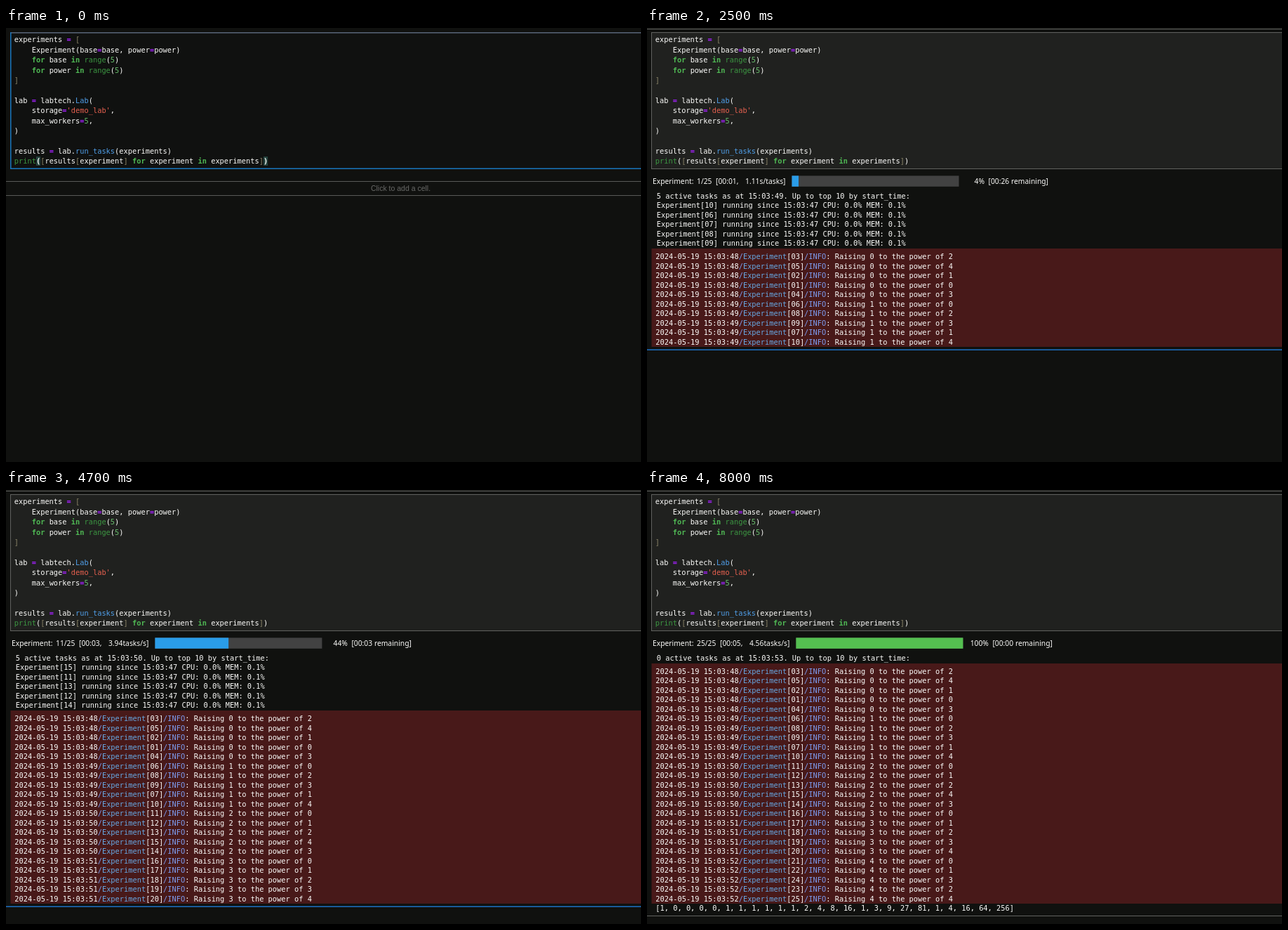
An HTML page with a canvas for the animation above (9900 ms loop, 905 px wide and 618 px high).

```html
<!DOCTYPE html>
<html lang="en">
<head>
<meta charset="utf-8">
<style>
  html, body { margin: 0; width: 100%; height: 100%; overflow: hidden; background: #10110f; }
  canvas { display: block; }
</style>
</head>
<body>
<canvas id="stage" width="905" height="618"></canvas>
<script>
const ctx = document.getElementById('stage').getContext('2d');
const LOOP = 9900, COL = 6.23, ROW = 13.5;
const MONO = '10.35px "DejaVu Sans Mono", monospace';
const SANS = '10.3px "Noto Sans", sans-serif';
const BLUE = '#1976bd', GREY = '#61625f', WHITE = '#fbfbf9';

const code = `experiments = [
    Experiment(base=base, power=power)
    for base in range(5)
    for power in range(5)
]

lab = labtech.Lab(
    storage='demo_lab',
    max_workers=5,
)

results = lab.run_tasks(experiments)
print([results[experiment] for experiment in experiments])`.split('\n');

// token pattern, colour, bold
const syntax = [
  [/^(for|in)$/, '#4fb854', true],
  [/^(range|print)$/, '#3c9742'],
  [/^(Lab|run_tasks)$/, '#4f9ee8'],
  [/^\d+$/, '#66bb6a'],
  [/^'/, '#e5604f'],
  [/^=$/, '#a020f8', true],
  [/^[[\]]$/, '#8a8468'],
  [/./, WHITE]
];

const order = [3, 5, 2, 1, 4, 6, 8, 9, 7, 10, 11, 12, 13, 15, 14,
  16, 17, 18, 19, 20, 21, 22, 24, 23, 25];

// start, done, elapsed, rate, remaining, bar left
const progress = [
  [1500, 0, '00:00', '?tasks/s', '?', 185],
  [2500, 1, '00:01', '1.11s/tasks', '00:26', 206.5],
  [3600, 6, '00:02', '3.15tasks/s', '00:06', 206.5],
  [4500, 11, '00:03', '3.94tasks/s', '00:03', 212.4],
  [5500, 16, '00:04', '4.27tasks/s', '00:02', 212.4],
  [6500, 25, '00:05', '4.56tasks/s', '00:00', 212.4]
];

// start, clock second, running tasks
const activity = [
  [1500, 48, []],
  [2500, 49, [10, 6, 7, 8, 9]],
  [3900, 50, [15, 11, 13, 12, 14]],
  [5000, 51, [20, 16, 18, 17, 19]],
  [6200, 52, [25, 21, 23, 22, 24]],
  [6900, 53, []]
];

const batchTimes = [1500, 2500, 3600, 4500, 5500];
const current = (states, t) => states.filter(s => s[0] <= t).pop();
const pad = n => String(n).padStart(2, '0');

// Baselines sit on whole pixels so that the glyphs stay crisp.
function text(s, x, y, color = WHITE, font = MONO, align = 'left') {
  ctx.font = font;
  ctx.fillStyle = color;
  ctx.textAlign = align;
  ctx.fillText(s, x, Math.round(y));
}

function box(x, y, w, h, color) {
  ctx.fillStyle = color;
  ctx.fillRect(x, y, w, h);
}

const rule = (y, color, weight = 1) => box(0, y, 905, weight, color);

function drawCell(focused) {
  if (!focused) rule(1, GREY);
  box(6, 6, 899, 195, focused ? '#101110' : '#20211f');
  if (focused) {
    box(6, 6, 899, 1.5, '#596579');
    box(6, 6, 1.5, 195, BLUE);
    box(6, 199.5, 899, 1.5, BLUE);
    for (const col of [5, 57]) box(11.8 + col * COL, 183, COL, 13, '#25423d');
  } else {
    box(6, 6, 899, 1, GREY);
    box(6, 6, 1, 195, GREY);
    box(6, 200, 899, 1, GREY);
  }
  code.forEach((line, row) => {
    for (const m of line.matchAll(/'[^']*'|\w+|[^\w\s]/g)) {
      const [, color, bold] = syntax.find(entry => entry[0].test(m[0]));
      const matched = focused && row === 12 && (m.index === 5 || m.index === 57);
      text(m[0], 11.8 + m.index * COL, 20.3 + row * 14.42, color, (bold || matched ? 'bold ' : '') + MONO);
    }
  });
}

function drawProgress([, done, elapsed, rate, remaining, left]) {
  const sans = (s, x, align) => text(s, x, 222, WHITE, SANS, align);
  sans('Experiment:', 8);
  sans(done + '/25', 71);
  sans(`[${elapsed},`, done > 9 ? 104 : 98);
  sans(rate + ']', left - 9, 'right');
  box(left, 210.4, 238, 15.4, '#424242');
  box(left, 210.4, 238 * done / 25, 15.4, done === 25 ? '#54bf50' : '#2a9ce8');
  sans(done * 4 + '%', left + 274.5, 'right');
  sans('[' + remaining, left + 280);
  sans('remaining]', left + (done ? 365.5 : 343.5), 'right');
}

function drawLogLine(id, y) {
  const base = Math.floor((id - 1) / 5);
  const parts = [
    [0, `2024-05-19 15:03:${48 + base}`],
    [19, '/', '#7d9bee'],
    [20, 'Experiment', '#67a9e4'],
    [30, `[${pad(id)}]`],
    [34, '/INFO', '#7d9bee'],
    [39, `: Raising ${base} to the power of ${(id - 1) % 5}`]
  ];
  for (const [col, s, color] of parts) text(s, 12.3 + col * COL, y, color);
}

function drawOutput(t) {
  const [, second, tasks] = current(activity, t);
  const finished = t >= 6900;
  const count = 5 * batchTimes.filter(start => start <= t).length;
  drawProgress(current(progress, t));

  text(`${tasks.length} active tasks as at 15:03:${second}. Up to top 10 by start_time:`, 13.8, 243);
  tasks.forEach((id, i) =>
    text(`Experiment[${pad(id)}] running since 15:03:47 CPU: 0.0% MEM: 0.1%`, 13.8, 256 + i * ROW));

  const top = 247.5 + tasks.length * ROW;
  const bottom = top + count * ROW + 4;
  const edge = Math.floor(top - 0.5);
  box(6.5, edge, 898.5, Math.round(bottom) - edge, '#481919');
  order.slice(0, count).forEach((id, i) => drawLogLine(id, top + 14.2 + i * ROW));

  let end = bottom + 4.5;
  if (finished) {
    const results = Array.from({ length: 25 }, (_, i) => Math.floor(i / 5) ** (i % 5));
    text(`[${results.join(', ')}]`, 12.3, bottom + 10.2);
    end += ROW;
  }
  const idle = finished || (t >= 3600 && t < 3700);
  const weight = idle ? 1 : 1.5;
  rule(Math.ceil(end) - weight, idle ? GREY : '#1d70c4', weight);
}

function draw(now) {
  const t = now % LOOP;
  box(0, 0, 905, 618, '#10110f');
  drawCell(t < 1300);
  if (t < 1500) {
    rule(218, '#585957');
    rule(238, '#585957');
    text('Click to add a cell.', 562.5, 232, '#686967', '10.5px "Liberation Sans", Arial, sans-serif', 'center');
  } else {
    drawOutput(t);
  }
  requestAnimationFrame(draw);
}
requestAnimationFrame(draw);
</script>
</body>
</html>
```
